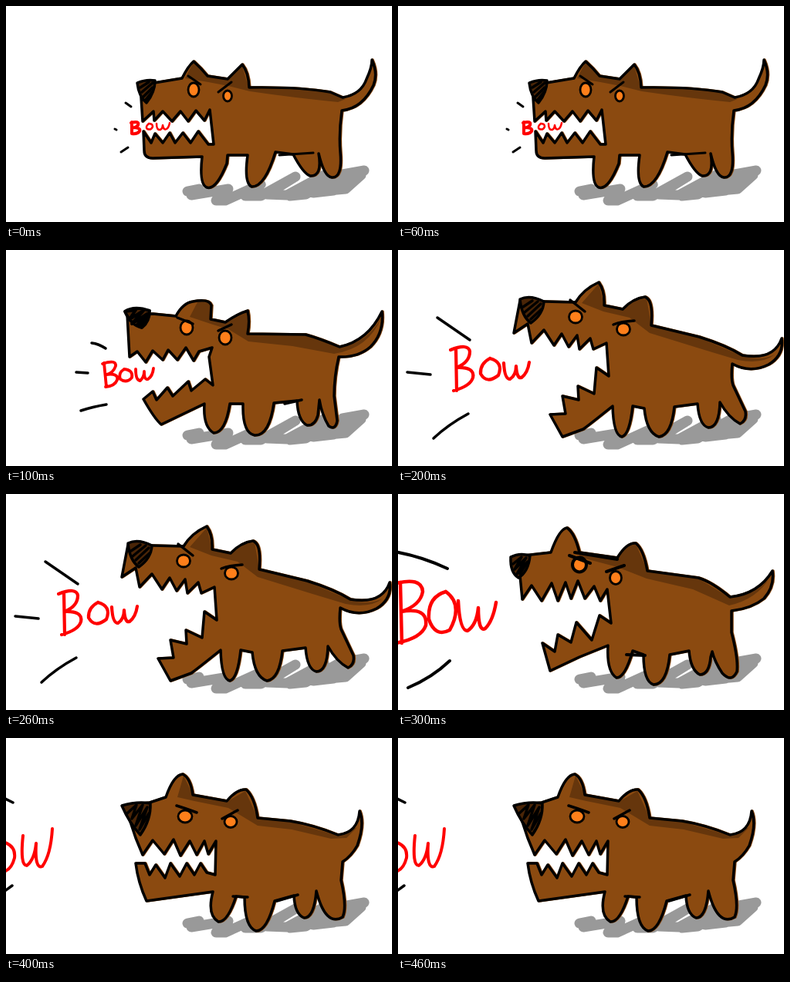
Animation, 500 px wide and 281 px high, one loop 500 ms. Source, as an HTML page:

```html
<!DOCTYPE html>
<html lang="en">
<head>
<meta charset="utf-8">
<title>Barking dog</title>
<style>
  html, body { margin: 0; height: 100%; overflow: hidden; background: #fff; }
  svg { display: block; width: 100vw; height: 100vh; }
  path, ellipse { fill: none; stroke: #000; stroke-width: 3.5; stroke-linecap: round; stroke-linejoin: round; }
  #shadow { stroke: #999; stroke-width: 13; }
  .body { fill: #8b4a10; filter: drop-shadow(1.5px 0 0 #8b4a10); }
  .shade { fill: #000; fill-opacity: .27; stroke: none; }
  .nose { fill: #4a2507; }
  .eye { fill: #ff7f1a; stroke-width: 2.8; }
  .bark { stroke: #f00; stroke-width: 3.8; }
</style>
</head>
<body>
<svg viewBox="0 0 500 281">
  <path id="shadow" d="M235 241L250 238 240 246 288 238 272 253 284 253 330 232 310 247 330 247 375 222 338 245 364 246 412 220 368 247 388 245 430 221 398 243 424 240 464 214 436 219 418 240 440 238 460 220"/>

  <g class="pose">
    <path class="body" d="M174 104L192 100 228 94Q236 78 243 72Q252 80 261 91L287 95Q300 82 306 76Q314 86 315 106Q380 105 420 112L436 119Q460 115 467 95Q474 80 474 70Q482 88 476 103Q462 133 435 136Q431 165 433 190Q436 224 422 223Q412 222 405 192Q410 222 394 221Q385 218 372 193L349 190Q335 236 318 235Q308 230 313 194L287 194 286 205Q272 240 260 236Q250 232 254 196L190 198Q179 198 179 188L178 163 188 178 193 166 203 178 212 165 219 178 229 165 239 178 249 163 262 180 269 180 264 135 257 149 246 136 236 150 226 137 215 150 203 137 192 149 191 137 177 150Z"/>
    <path class="shade" d="M232 94L243 73 261 91 287 95 306 78 314 106Q380 106 420 113L440 121 430 125Q370 119 316 111L288 104 262 99Z"/>
    <path class="nose" d="M170 100Q182 95 193 97Q193 112 182 126Q172 118 170 100Z"/>
    <path d="M174 106L185 99M176 112L190 100M178 118L190 106M181 122L189 112" stroke-width="2"/>
    <ellipse class="eye" cx="243" cy="109" rx="7" ry="9"/>
    <ellipse class="eye" cx="287" cy="117" rx="5.5" ry="7"/>
    <path d="M236 91L252 102M275 112L292 99M354 194L398 191M155 126L162 131M141 160L143 161M149 190L158 184" style="stroke-width:3"/>
    <path class="bark" d="M163 151L163 166M162 152Q173 149 171 155Q168 159 164 158Q175 158 173 163Q170 167 163 166" style="stroke-width:4"/>
    <path class="bark" d="M185 153Q180 157 183 160Q188 162 190 157Q190 153 185 153M195 153Q195 162 200 161Q203 159 203 155Q204 162 208 160Q211 158 212 152" style="stroke-width:2.5"/>
  </g>

  <g class="pose">
    <path class="body" d="M157 84L190 83 220 86Q229 69 242 67Q263 63 266 72L265 90 284 94Q300 83 313 79Q316 92 313 109L388 110Q406 115 432 126Q469 118 487 80Q490 108 472 126Q456 140 431 139Q425 165 425 190L429 222Q427 235 418 229Q409 214 406 195L404 215Q400 229 390 228Q378 222 377 196L347 199Q341 242 322 241Q306 238 307 200L290 200Q284 238 269 238Q255 230 257 200L201 227Q192 219 178 194L190 184 195 195 209 179 216 190 236 171 240 183 258 168 268 176 263 139 267 127 250 132 243 144 233 127 222 143 210 130 203 143 190 131 181 146 170 132 160 139Z"/>
    <path class="shade" d="M238 87L249 66 264 70 265 90 284 95 312 81 313 109 388 111 433 127Q470 119 486 88Q470 128 425 135L371 125 314 119 288 103 268 97Z"/>
    <path class="nose" d="M154 80Q166 72 186 79Q186 93 176 101Q162 98 154 80L168 78 160 90 178 79 163 96 183 83 169 98 185 87 175 98" style="stroke-width:4"/>
    <ellipse class="eye" cx="234" cy="101" rx="8" ry="9"/>
    <ellipse class="eye" cx="284" cy="114" rx="8" ry="9"/>
    <path d="M222 88L242 96M275 105L292 97M361 200L383 195M111 121Q120 122 129 128M91 159L106 160M97 209Q112 204 130 201"/>
    <path class="bark" d="M127 147L130 178M125 148Q143 142 142 151Q139 160 130 162Q146 160 144 169Q141 177 129 178M153 155Q145 160 148 168Q156 174 163 166Q165 156 153 155M168 155Q168 170 174 170Q179 165 179 158Q179 170 184 168Q190 164 191 154"/>
  </g>

  <g class="pose">
    <path class="body" d="M158 66L190 67 230 68Q240 51 260 42Q268 53 267 72L291 77Q304 63 320 61Q331 65 328 98L390 113Q425 124 446 137Q487 144 497 115Q500 137 480 149Q456 161 433 148Q431 167 434 176L450 210Q452 222 443 226Q428 218 417 198Q416 231 402 231Q390 228 388 200L358 204Q354 241 338 243Q322 238 319 206L304 203Q300 240 290 243Q279 241 278 203Q252 224 240 233L213 243 197 214 217 213 213 190 234 195 233 177 254 187 257 153 273 164 270 121 253 129 249 115 235 129 232 111 221 126 212 109 202 124 189 104 173 121 168 96 150 108Z"/>
    <path class="shade" d="M238 69L260 44 267 72 291 78 307 66 322 63 328 98 390 114 446 138Q470 145 488 136Q472 149 440 143L397 130 326 108 300 88 266 80Z"/>
    <path class="nose" d="M158 64Q171 58 189 67Q188 84 172 95Q160 86 158 64Z"/>
    <path d="M162 74L174 66M164 81L181 67M168 86L185 70M172 90L186 77"/>
    <ellipse class="eye" cx="230" cy="87" rx="8.5" ry="8"/>
    <ellipse class="eye" cx="292" cy="103" rx="8.5" ry="8"/>
    <path d="M223 65L242 80M279 97Q289 93 306 92M51 88L93 117M12 159L42 162M46 245Q65 227 91 213"/>
    <path class="bark" d="M75 128L76 183M68 130Q91 121 93 132Q93 146 76 153Q100 152 97 166Q94 177 72 183M119 141Q106 148 107 161Q115 175 130 163Q137 146 119 141M137 147Q138 168 145 168Q153 163 153 151Q154 168 160 166Q168 160 170 146" style="stroke-width:4.2"/>
  </g>

  <g class="pose">
    <path class="body" d="M147 82L172 79 198 76Q209 45 219 44Q229 51 235 76L284 83Q296 63 308 64Q318 72 323 100L389 109Q406 114 430 134Q467 130 485 100Q488 120 474 136Q458 149 432 152L432 180Q441 215 439 231Q432 246 420 233Q410 218 407 205L405 212Q403 235 391 235Q379 229 377 204L352 209Q348 248 331 248Q318 244 318 209L304 204Q294 239 283 239Q270 231 272 197L235 212 197 230 187 194 203 205 207 183 224 193 231 167 251 190 261 158 276 168 271 124 262 139 254 120 242 136 233 113 224 136 217 115 207 139 199 116 186 139 173 119 161 137 158 106Z"/>
    <path class="shade" d="M235 76L284 84 296 69 308 65 323 100 389 110 430 135Q467 131 482 108Q465 137 429 145L382 124 322 110 284 95 235 82Z"/>
    <path class="nose" d="M146 82Q157 76 171 80Q169 101 156 109Q145 102 146 82Z"/>
    <path d="M149 91L160 82 151 98 166 83 154 104 168 88 158 104"/>
    <ellipse class="eye" cx="235" cy="92" rx="9" ry="9.5" style="stroke-width:4"/>
    <ellipse class="eye" cx="282" cy="109" rx="7.5" ry="8.5"/>
    <path d="M222 80L249 90M229 76L284 85M270 101L293 93M296 209L320 210M-5 75Q30 81 64 97M13 252Q44 239 67 217" style="stroke-width:4"/>
    <path class="bark" d="M3 115L5 194M-6 117Q31 107 32 127Q29 145 4 153Q39 147 36 171Q30 188 -3 194M62 127Q38 134 40 163Q48 187 67 177Q85 144 62 127M78 139Q80 178 90 178Q102 170 104 148Q104 180 113 175Q123 165 127 141" style="stroke-width:4.5"/>
  </g>

  <g class="pose">
    <path class="body" d="M154 88L186 84 207 77Q217 48 229 47Q239 52 242 74L286 82Q299 66 311 67Q322 77 326 104L368 108Q398 113 430 126Q456 123 458 95Q465 112 455 140Q447 154 436 161L434 185Q442 220 436 233Q414 246 402 199Q399 234 386 234Q374 229 373 205L348 212Q338 251 324 251Q309 246 309 207L298 206Q287 240 275 239Q260 230 268 200L182 212Q171 188 168 163L180 163 186 178 194 165 206 182 213 163 225 180 234 163 244 178 252 163 260 175 271 178 272 134 262 151 257 134 247 152 238 134 226 153 217 132 205 151 190 133 177 152 168 130Z"/>
    <path class="shade" d="M222 77L230 49 242 74 286 83 310 69 326 104 368 109 430 127 455 116 441 130 421 131 370 119 326 114 288 91 244 82Z"/>
    <path class="nose" d="M150 88Q170 82 187 85Q188 106 174 126Q160 111 150 88Z"/>
    <path d="M157 98L169 87 163 105 177 87 168 114 183 90 173 119 185 98"/>
    <ellipse class="eye" cx="232" cy="102" rx="9" ry="8"/>
    <ellipse class="eye" cx="291" cy="109" rx="8" ry="7.5"/>
    <path d="M221 88Q231 91 247 97M280 105L300 94M294 206L313 207M351 212L378 204M-3 78L9 84M-3 200L8 192"/>
    <path class="bark" d="M-4 135Q13 140 11 156Q7 172 -4 174M22 127Q18 166 27 166Q37 158 39 137Q37 171 47 167Q58 152 60 118" style="stroke-width:4"/>
  </g>
</svg>
<script>
  const STEP = 100;
  const poses = [...document.querySelectorAll('.pose')];

  function draw() {
    const current = Math.floor(performance.now() / STEP) % poses.length;
    poses.forEach((pose, i) => pose.style.display = i === current ? '' : 'none');
    requestAnimationFrame(draw);
  }
  draw();
</script>
</body>
</html>
```
